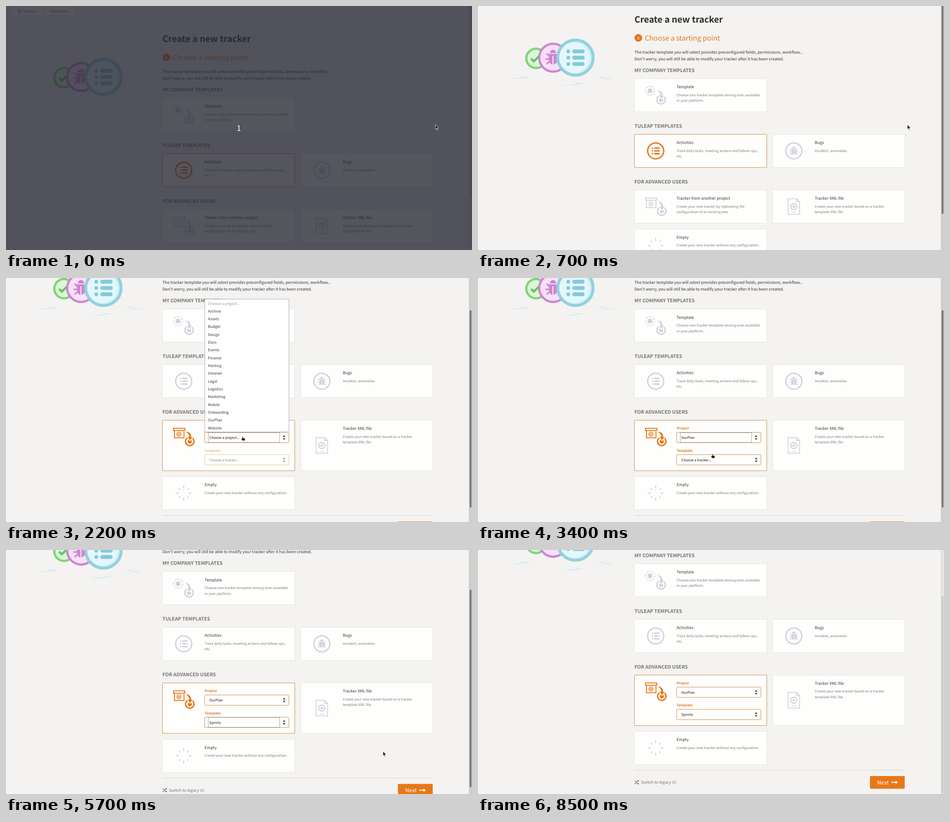
Animation, 1032 px wide and 543 px high, one loop 8.6 s. Source, as an HTML page:

```html
<!DOCTYPE html>
<html lang="en">
<head>
<meta charset="utf-8">
<title>Create a new tracker</title>
<style>
  html, body { margin: 0; width: 100%; height: 100%; overflow: hidden; background: #f4f3f1; }
  svg { display: block; width: 100%; height: 100%; }
  text {
    font-family: "Noto Sans CJK SC", "Noto Sans CJK JP", "Noto Sans", sans-serif;
    font-size: 8.87px; fill: #333; text-rendering: geometricPrecision; white-space: pre;
  }
  .title { font-size: 19.42px; font-weight: 700; fill: #2b2b2b; }
  .step { font-size: 15.46px; fill: #e87817; }
  .section { font-size: 10.7px; font-weight: 700; fill: #747474; }
  .desc { font-size: 7.77px; fill: #7b7b7b; }
  .label { font-size: 7.65px; font-weight: 700; fill: #d47a28; }
  .value { font-size: 7.77px; fill: #111; }
  .option { font-size: 8.25px; }
  .crumb { font-size: 7.2px; fill: #666; }
  .current { font-size: 7.1px; font-weight: 700; fill: #e07a1c; }
  .card > rect { fill: #fefefd; stroke: #e5e4e1; }
  .card.lit > rect { stroke: #c98d45; }
  .icon { color: #d1d4dd; }
  .selected .icon { color: #e87817; }
  .select { fill: #fefefd; stroke: #c98d45; }
  .focus { fill: none; stroke: #8b8b8b; stroke-width: .8; }
  .cursor { fill: #111; stroke: #fff; stroke-width: .8; }
</style>
</head>
<body>
<svg viewBox="0 0 1032 543">
  <defs>
    <g id="list" fill="none" stroke="currentColor">
      <circle r="17.8" stroke-width="3"/>
      <path d="M-2.2-6.3H7.4M-2.2 0H7.4M-2.2 6.3H7.4M-7.2-6.3h.01M-7.2 0h.01M-7.2 6.3h.01" stroke-width="3.3" stroke-linecap="round"/>
    </g>
    <g id="insect">
      <path d="M-4-5.6a4 4.300 0 0 1 8 0zM-5.200-4.400H5.200V3a5.200 6 0 0 1-10.400 0z" fill="currentColor"/>
      <path d="M-4.500-1.800-8-5.200M-4.500 2H-9.600M-4.500 5-8 8.600M4.500-1.800 8-5.200M4.500 2H9.600M4.500 5 8 8.600" fill="none" stroke="currentColor" stroke-width="2"/>
      <path d="M0-2V9" stroke="#fefefd"/>
    </g>
    <g id="bug">
      <circle r="17.8" fill="none" stroke="currentColor" stroke-width="3"/>
      <use href="#insect"/>
    </g>
    <g id="drop">
      <circle cx="12" cy="10" r="9.3" fill="none" stroke="currentColor" stroke-width="3"/>
      <circle cx="12" cy="10.5" r="4.6" fill="currentColor"/>
      <path d="M.5-12C10-13.5 16-8 15.5-.5L20-.5 12.5 8.5 5.500-.5 10-.5C10-5 7-9 .5-12Z" fill="currentColor" stroke="#fefefd" stroke-width="1.5"/>
    </g>
    <g id="copy">
      <circle cx="-12.5" cy="-10" r="10" fill="none" stroke="currentColor" stroke-width="2.2" stroke-dasharray="3.4 2.88"/>
      <circle cx="-12.5" cy="-10" r="5.4" fill="currentColor"/>
      <use href="#drop"/>
    </g>
    <g id="archive">
      <path d="M-22.5-19.2H2.7V-14H-22.5ZM-20.5-14V2.2H.7V-14" fill="none" stroke="currentColor" stroke-width="2"/>
      <circle cx="-10.5" cy="-6" r="4.5" fill="none" stroke="currentColor" stroke-width="1.8"/>
      <circle cx="-10.5" cy="-6" r="2" fill="currentColor"/>
      <use href="#drop" x="1.5"/>
    </g>
    <g id="xml" fill="none" stroke="currentColor">
      <path d="M-12.7-17.5H6L12.7-10.8V17.5H-12.7ZM6-17.5V-10.8H12.7" stroke-width="1.9"/>
      <circle r="6.8" stroke-width="2.4"/>
      <circle r="3" fill="currentColor" stroke="none"/>
      <text y="14.8" text-anchor="middle" style="font-size:4.6px;font-weight:700;fill:currentColor" stroke="none">XML</text>
    </g>
    <g id="spinner" fill="none" stroke="currentColor" stroke-width="2.3">
      <path d="M0-17V-10.5M0 17V10.5M-17 0H-10.5M17 0H10.5"/>
      <path d="M-10.8-10.8l3 3M10.8-10.8l-3 3M-10.8 10.8l3-3M10.8 10.8l-3-3"/>
    </g>
  </defs>

  <rect width="1032" height="543" fill="#f4f3f1"/>
  <g id="page">
    <path d="M11.5-.5H79L89 11 79 22H11.5Z" fill="#fefefd" stroke="#dfdedb"/>
    <path d="M79-.5H146.5L156 11 146.500 22H79L89 11Z" fill="#fefefd" stroke="#ecc296"/>
    <path d="M28.5 8.7H33.5M28.5 11.5H33.5M28.5 14.3H33.5M25.5 8.7h1.6M25.5 11.5h1.6M25.5 14.3h1.6" stroke="#666" stroke-width="1.3"/>
    <path d="M71 10.8l1.7 1.7 1.7-1.7" fill="none" stroke="#aaa" stroke-width=".8"/>
    <text class="crumb" x="37" y="14.2">Trackers</text>
    <text class="current" x="97" y="14.2">New tracker</text>

    <circle cx="128.5" cy="159.5" r="21.5" fill="#d9f8d5" stroke="#85d17f" stroke-width="5"/>
    <path d="M117.5 160l6 6 11.5-11" fill="none" stroke="#6cc268" stroke-width="5"/>
    <circle cx="166.5" cy="158" r="31" fill="#fadffa" stroke="#cc88d0" stroke-width="5"/>
    <use href="#insect" transform="translate(166 157.5) scale(1.75)" color="#cc88d0"/>
    <circle cx="215.800" cy="157.800" r="39.2" fill="#d2eef6" stroke="#93d1e0" stroke-width="6.5"/>
    <circle cx="213.5" cy="158" r="33.5" fill="#e4f7fc"/>
    <path d="M213 144H232M213 158H232M213 172H232M200 144h.01M200 158h.01M200 172h.01" stroke="#84c9da" stroke-width="8.5" stroke-linecap="round"/>
    <path d="M93 201H112M114.5 201H118M80 204.3H84M86 204.3H105M107.5 204.3H110M262 201H267M270 201H280M272 204.3H276M279 204.3H292M294 204.3H297M213 215.2H227M229 215.2H232.5M191 218.5H194M196 218.5H216M219 218.5H221M224 218.5H227" stroke="#c3e3ee" stroke-width="1.3"/>

    <text class="title" x="346.5" y="80">Create a new tracker</text>
    <circle cx="355" cy="114" r="8.5" fill="#e87817"/>
    <text x="355" y="117" text-anchor="middle" style="font-size:8px;font-weight:700;fill:#fff">1</text>
    <text class="step" x="369.5" y="120">Choose a starting point</text>
    <text x="346.5" y="148.7">The tracker template you will select provides preconfigured fields, permissions, workflow...</text>
    <text x="346.5" y="163.5">Don't worry, you will still be able to modify your tracker after it has been created.</text>
    <text class="section" x="346.5" y="190">MY COMPANY TEMPLATES</text>
    <text class="section" x="346.5" y="314">TULEAP TEMPLATES</text>
    <text class="section" x="346.5" y="437.7">FOR ADVANCED USERS</text>
    <g id="cards"></g>
    <g id="footer">
      <path d="M346.5 625.7H945.5" stroke="#d5d4d2"/>
      <path d="M346.5 649.8h2.3l4 5.8h3M346.5 655.6h2.3l4-5.8h3M354 648l2 1.8-2 1.8M354 653.8l2 1.8-2 1.8" fill="none" stroke="#777" stroke-width="1.2"/>
      <text x="361" y="656" style="fill:#777">Switch to legacy UI</text>
      <rect x="868" y="639.7" width="77" height="28" rx="2" fill="#000" opacity=".12"/>
      <rect id="next" x="868" y="638.7" width="77" height="28" rx="2"/>
      <text x="884" y="657.3" style="font-size:12.15px;fill:#fff">Next</text>
      <path d="M915.5 652.7H926" stroke="#fff" stroke-width="2.2"/>
      <path d="M924.5 648.7l5 4-5 4z" fill="#fff"/>
    </g>
  </g>

  <rect id="track" x="1025" width="7" height="543"/>
  <path d="M1025.5 0V543" stroke="#d2d1ce"/>
  <rect id="thumb" x="1026.8" width="4" rx="2"/>
  <g id="projects"></g>
  <g id="trackers"></g>
  <g id="countdown">
    <rect width="1032" height="543" fill="rgb(40,40,53)" opacity=".79"/>
    <text x="515.5" y="278" text-anchor="middle" style="font-size:17.5px;fill:#fff">1</text>
  </g>
  <g id="cursor">
    <path id="arrow" class="cursor" d="M0 0V10.4L2.3 8.3 3.9 12.2 5.5 11.5 3.9 7.7H7.1Z"/>
    <path id="hand" class="cursor" d="M-1 .6Q0-.8 1 .6V3.8L4.8 4.6Q5.8 5 5.6 6.3L5 10H-.8L-3.3 6Q-3.4 4.8-2.3 5L-1 6Z"/>
  </g>
</svg>
<script>
const LOOP = 8600, GROW = 38.4, BOTTOM = 135.7, CARD_H = 73.8, ROW = 17.33;
const OPEN_CARD = 1800, PICK_PROJECT = 3100, PICK_TRACKER = 4900;
const $ = id => document.getElementById(id);
const show = (id, on) => { $(id).style.display = on ? '' : 'none'; };

const cards = [
  { id: 'template', x: 346.5, y: 204.7, icon: 'copy', title: 'Template', lines: ['Choose one tracker template among ones available', 'in your platform.'] },
  { id: 'activities', x: 346.5, y: 328.5, icon: 'list', title: 'Activities', lines: ['Track daily tasks, meeting actions and follow-ups,', 'etc.'] },
  { id: 'bugs', x: 652.5, y: 328.5, icon: 'bug', title: 'Bugs', lines: ['Incident, anomalies'] },
  { id: 'project', x: 346.5, y: 452.4, icon: 'archive', title: 'Tracker from another project', lines: ['Create your new tracker by replicating the', 'configuration of an existing one.'], tall: true },
  { id: 'file', x: 652.5, y: 452.4, icon: 'xml', title: 'Tracker XML file', lines: ['Create your new tracker based on a tracker', 'template XML file.'], tall: true },
  { id: 'empty', x: 346.5, y: 539.2, icon: 'spinner', title: 'Empty', lines: ['Create your new tracker without any configuration.'], low: true },
];

const cardMarkup = c => `<g id="${c.id}" class="card" transform="translate(${c.x} ${c.y})">
  <rect width="293" height="${CARD_H}" rx="1"/>
  <g class="icon" transform="translate(47 36.9)"><use href="#${c.icon}"/></g>
  <g class="info"><text x="93.3" y="21.6">${c.title}</text>
  ${c.lines.map((s, i) => `<text class="desc" x="93.3" y="${39.2 + i * 12.35}">${s}</text>`).join('')}</g></g>`;

const fieldMarkup = (id, label, y) => `<g id="${id}" transform="translate(93.5 ${y})">
  <text class="label" y="-6.3">${label}</text>
  <rect class="select" width="186.5" height="23" rx="2"/>
  <rect class="focus" id="${id}Focus" x="8" y=".7" width="158" height="21.7"/>
  <text class="value" id="${id}Value" x="10.3" y="14.5"></text>
  <path d="M173.2 10.3l2.8-4.3 2.8 4.3zM173.2 12.9l2.8 4.3 2.8-4.3z" fill="#444"/></g>`;

const popupMarkup = (top, options) => `<rect x="440.3" y="${top - .6}" width="186.4" height="${options.length * ROW + 1.2}" fill="#fff" stroke="#aaa"/>` +
  options.map((s, i) => `<g class="row"><rect x="440.5" y="${top + i * ROW}" width="186" height="${ROW}" fill="#3c84dc"/>
  <text class="option" x="447.3" y="${top + i * ROW + 11.9}">${s}</text></g>`).join('');

const popups = {
  projects: { top: 47.6, from: 2100, to: PICK_PROJECT, options: ['Choose a project...', 'Archive', 'Assets', 'Budget', 'Design', 'Docs', 'Events', 'Finance', 'Hosting', 'Intranet', 'Legal', 'Logistics', 'Marketing', 'Mobile', 'Onboarding', 'OurPlan', 'Website'] },
  trackers: { top: 416.9, from: 3800, to: PICK_TRACKER, options: ['Choose a tracker...', 'Bugs', 'Epics', 'Releases', 'Sprints', 'Tasks', 'User Stories'] },
};

$('cards').innerHTML = cards.map(cardMarkup).join('');
$('project').insertAdjacentHTML('beforeend', `<g id="fields">${fieldMarkup('source', 'Project', 26.8)}${fieldMarkup('kind', 'Template', 76.3)}</g>`);
for (const id in popups) $(id).innerHTML = popupMarkup(popups[id].top, popups[id].options);

// Piecewise linear value of keys [time, ...values]
function along(keys, t) {
  let i = 0;
  while (i < keys.length - 2 && t >= keys[i + 1][0]) i++;
  const [a, b] = [keys[i], keys[i + 1]];
  const k = Math.min(1, Math.max(0, (t - a[0]) / (b[0] - a[0])));
  return a.slice(1).map((v, n) => v + (b[n + 1] - v) * k);
}

const pointer = [
  [0, 951, 264], [1300, 951, 264], [1400, 720, 318], [1500, 543, 348], [1600, 527, 351], [1700, 524, 352],
  [2500, 524, 352], [2600, 524, 334], [2700, 524, 334], [2800, 522, 316], [3100, 522, 316], [3200, 521, 342],
  [3300, 521, 342], [3400, 519, 391], [3600, 522, 404], [4100, 522, 404], [4200, 520, 430], [4600, 505, 488],
  [4900, 505, 488], [5000, 560, 478], [5200, 760, 455], [5400, 835, 448], [5900, 835, 448], [6100, 895, 515],
  [6200, 905, 528], [7500, 905, 528], [7600, 760, 430], [7800, 135, 24], [7900, 135, 24], [8100, 56, 4], [8200, -20, -30],
];
const wheel = [[5500, 0], [5600, 6.5], [5700, 20.9], [5800, 32], [5900, GROW]];

function scrollAt(t) {
  const k = Math.min(1, Math.max(0, (t - 400) / 800));
  return BOTTOM * k * k * (3 - 2 * k) + along(wheel, t)[0];
}

function render(t) {
  const open = t >= OPEN_CARD, grow = open ? GROW : 0;
  const scroll = scrollAt(t), [x, y] = along(pointer, t);
  const between = (a, b) => t >= a && t < b;
  const popup = Object.values(popups).find(p => between(p.from, p.to));

  $('page').setAttribute('transform', `translate(0 ${-scroll})`);
  $('footer').setAttribute('transform', `translate(0 ${grow})`);
  for (const c of cards) {
    const el = $(c.id), top = c.y + (c.low ? grow : 0), h = CARD_H + (c.tall ? grow : 0);
    const selected = c.id === (open ? 'project' : 'activities');
    const over = !popup && x > c.x && x < c.x + 293 && y > top - scroll && y < top - scroll + h;
    el.setAttribute('transform', `translate(${c.x} ${top})`);
    el.firstElementChild.setAttribute('height', h);
    el.classList.toggle('selected', selected);
    el.classList.toggle('lit', selected || over);
  }
  $('file').querySelector('.icon').setAttribute('transform', `translate(47 ${36.9 + grow / 2})`);
  $('project').querySelector('.info').style.display = open ? 'none' : '';
  show('fields', open);
  show('sourceFocus', between(2100, 3800));
  show('kindFocus', between(3800, 8500));
  $('sourceValue').textContent = t < PICK_PROJECT ? 'Choose a project...' : 'OurPlan';
  $('kindValue').textContent = t < PICK_TRACKER ? 'Choose a tracker...' : 'Sprints';
  $('kind').style.opacity = t < 3200 ? .5 : 1;
  $('next').setAttribute('fill', between(OPEN_CARD, PICK_TRACKER) ? '#f0aa6a' : between(6200, 7600) ? '#de7014' : '#e87817');

  for (const id in popups) {
    const p = popups[id], hot = Math.floor((y - p.top) / ROW);
    show(id, p === popup);
    $(id).querySelectorAll('.row').forEach((row, i) => {
      const on = i > 0 && i === hot;
      row.firstElementChild.style.opacity = on ? 1 : 0;
      row.lastElementChild.style.fill = on ? '#fff' : i ? '#333' : '#9a9a9a';
    });
  }

  const focused = between(500, 8500);
  $('track').setAttribute('fill', focused ? '#cfcecb' : '#e6e5e2');
  $('thumb').setAttribute('fill', focused ? '#777775' : '#c8c8c4');
  $('thumb').setAttribute('y', open ? 71.5 + (scroll - BOTTOM) * .807 : -38 + scroll * .855);
  $('thumb').setAttribute('height', open ? 439.5 : 464);

  const hand = between(OPEN_CARD, 2600) || between(3200, 4200) || between(6200, 7600);
  $('cursor').setAttribute('transform', `translate(${x} ${y})`);
  show('hand', hand);
  show('arrow', !hand);
  show('countdown', t < 400);
}

let start, last = -1;
function frame(now) {
  start ??= now;
  const t = Math.floor((now - start) % LOOP / 100) * 100;
  if (t !== last) render(last = t);
  requestAnimationFrame(frame);
}
render(0);
requestAnimationFrame(frame);
</script>
</body>
</html>
```
